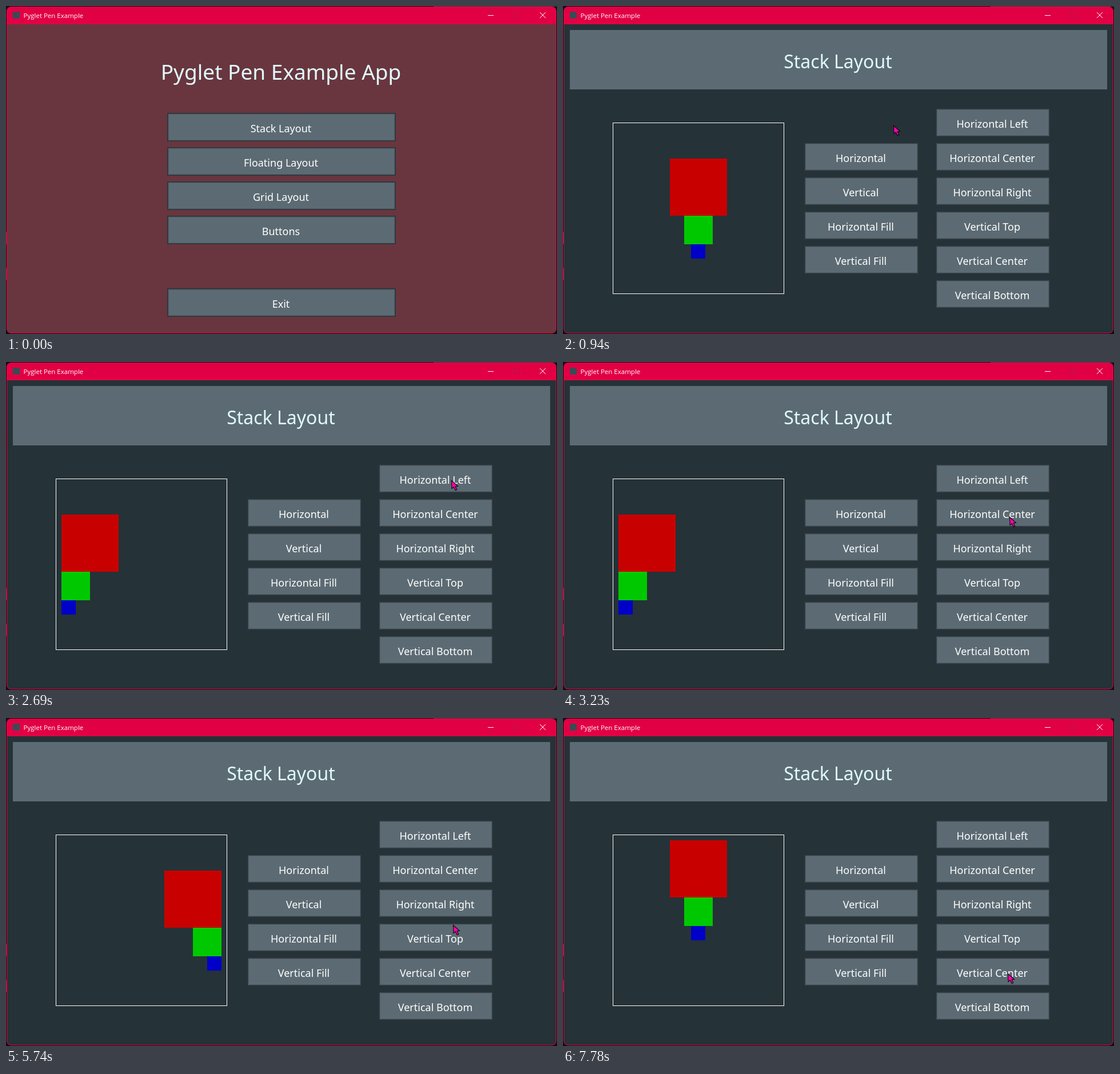
An HTML page with a canvas for the animation above (8 s loop, 964 by 574 pixels).

```html
<!DOCTYPE html>
<html lang="en">
<head>
<meta charset="utf-8">
<title>Pyglet Pen Example</title>
<style>
html, body { margin: 0; width: 100%; height: 100%; overflow: hidden; background: #0b0e11; }
canvas { display: block; }
</style>
</head>
<body>
<canvas id="stage" width="964" height="574"></canvas>
<script>
const ctx = document.getElementById('stage').getContext('2d');
const LOOP = 8000, STEP = 65, HOLD = 70;
const RED = '#e20044', SLATE = '#5c6b73', DARK = '#253237', PALE = '#e0fbfc';

// The pointer glides to each place between two times and rests there.
const entry = { x: 652, y: 545 };
const glides = [
  { from: 130, to: 610, x: 575, y: 204 },
  { from: 940, to: 1490, x: 652, y: 354 },
  { from: 1690, to: 1950, x: 755, y: 235 },
  { from: 2020, to: 2150, x: 765, y: 197 },
  { from: 2490, to: 2760, x: 781, y: 208 },
  { from: 3100, to: 3230, x: 781, y: 271 },
  { from: 3770, to: 4000, x: 784, y: 320 },
  { from: 4270, to: 4620, x: 782, y: 385 },
  { from: 5740, to: 5740, x: 782, y: 362 },
  { from: 5810, to: 6000, x: 781, y: 271 },
  { from: 6080, to: 6700, x: 782, y: 388 },
  { from: 6830, to: 7100, x: 782, y: 397 },
  { from: 7500, to: 7780, x: 778, y: 447 }
];

// A click holds a button down, then applies its change on release.
const clicks = [
  { at: 870, label: 'Stack Layout', set: { screen: 'stack' } },
  { at: 2420, label: 'Horizontal Left', set: { h: 0 } },
  { at: 3430, label: 'Horizontal Center', set: { h: 0.5 } },
  { at: 4200, label: 'Horizontal Right', set: { h: 1 } },
  { at: 6010, label: 'Horizontal Center', set: { h: 0.5 } },
  { at: 6760, label: 'Vertical Top', set: { v: 0 } }
];

const menu = ['Stack Layout', 'Floating Layout', 'Grid Layout', 'Buttons'];
const modes = ['Horizontal', 'Vertical', 'Horizontal Fill', 'Vertical Fill'];
const aligns = ['Horizontal Left', 'Horizontal Center', 'Horizontal Right',
  'Vertical Top', 'Vertical Center', 'Vertical Bottom'];

function box(x, y, w, h, color) {
  ctx.fillStyle = color;
  ctx.fillRect(x, y, w, h);
}

function frame(x, y, size, color) {
  ctx.strokeStyle = color;
  ctx.lineWidth = 1;
  ctx.strokeRect(x + 0.5, y + 0.5, size, size);
}

function line(x1, y1, x2, y2) {
  ctx.strokeStyle = '#fff';
  ctx.lineWidth = 1;
  ctx.beginPath();
  ctx.moveTo(x1, y1);
  ctx.lineTo(x2, y2);
  ctx.stroke();
}

function panel(x, y, w, h, radii, color) {
  ctx.fillStyle = color;
  ctx.beginPath();
  ctx.roundRect(x, y, w, h, radii);
  ctx.fill();
}

function text(str, x, y, size, color) {
  ctx.font = `${size}px "Noto Sans", sans-serif`;
  ctx.textAlign = 'center';
  ctx.fillStyle = color;
  ctx.fillText(str, x, y);
}

function button(label, x, y, w, pressed) {
  const fill = label === pressed ? '#455259' : SLATE;
  box(x, y, w, 50, fill);
  // Bevel: dark rim fading inwards.
  [0.6, 0.45, 0.12].forEach((alpha, i) => {
    ctx.strokeStyle = `rgba(10,16,20,${alpha})`;
    ctx.lineWidth = 1;
    ctx.strokeRect(x + i + 0.5, y + i + 0.5, w - 2 * i - 1, 49 - 2 * i);
  });
  text(label, x + w / 2 - 1, y + 34, 18, '#fff');
}

function column(labels, x, y, w, pressed) {
  labels.forEach((label, i) => button(label, x, y + 60 * i, w, pressed));
}

function drawWindow(bg) {
  box(0, 0, 964, 574, '#0b0e11');
  box(748, 0, 216, 1, '#3a4248');
  for (const y of [396, 459]) box(0, y, 1, 21, RED);
  panel(1, 1, 962, 572, 8, RED);
  panel(2, 32, 960, 540, [0, 0, 7, 7], bg);
  box(12, 10, 12, 12, '#3b4a55');
  ctx.font = '500 11.5px "Open Sans", sans-serif';
  ctx.textAlign = 'left';
  ctx.fillStyle = '#fff';
  ctx.fillText('Pyglet Pen Example', 30.5, 21);
  line(843, 16.5, 853, 16.5);
  line(934, 11, 944, 21);
  line(944, 11, 934, 21);
  frame(888, 11, 9, 'rgba(105,54,63,.4)');
}

function drawMenu(pressed) {
  drawWindow('#69363f');
  text('Pyglet Pen Example App', 481, 129, 37, PALE);
  column(menu, 282, 187, 400, pressed);
  button('Exit', 282, 494, 400, pressed);
}

function drawStack(pressed, h, v) {
  drawWindow(DARK);
  box(12, 42, 940, 104, SLATE);
  text('Stack Layout', 481, 109, 32, PALE);
  frame(87, 204, 299, '#fff');
  let size = 100, y = 214 + Math.round(106 * v);
  for (const color of ['#c80000', '#00c800', '#0000c8']) {
    box(97 + Math.floor((280 - size) * h), y, size, size, color);
    y += size;
    size /= 2;
  }
  column(modes, 422, 239, 200, pressed);
  column(aligns, 652, 179, 200, pressed);
}

const ease = u => u * u * (3 - 2 * u);

// The pointer advances in even ticks, the first one at the start of a glide.
function pointerAt(t) {
  const i = glides.findLastIndex(g => g.from <= t);
  if (i < 0) return null;
  const a = glides[i - 1] || entry, b = glides[i];
  const ticks = ms => Math.floor(ms / STEP) + 1;
  const k = ease(Math.min(1, ticks(t - b.from) / ticks(b.to - b.from)));
  const mix = (p, q) => Math.round(p + (q - p) * k);
  return { x: mix(a.x, b.x), y: mix(a.y, b.y) };
}

const arrow = new Path2D('M.5 .5L1 14.5L4.4 11.8L7.3 17.5L9.8 16.4L7.2 10.9L11.5 10.4Z');

function drawPointer({ x, y }, pressed) {
  ctx.save();
  ctx.translate(x, y);
  ctx.fillStyle = '#f806aa';
  ctx.fill(arrow);
  ctx.strokeStyle = '#08080a';
  ctx.lineWidth = 1.1;
  ctx.stroke(arrow);
  if (pressed) {
    ctx.fillStyle = 'rgba(250,250,0,.49)';
    ctx.beginPath();
    ctx.arc(0, -1, 12, 0, 2 * Math.PI);
    ctx.fill();
  }
  ctx.restore();
}

function draw(t) {
  const state = { screen: 'menu', h: 0.5, v: 0.5 };
  let pressed = null;
  for (const c of clicks) {
    if (t >= c.at + HOLD) Object.assign(state, c.set);
    else if (t >= c.at) pressed = c.label;
  }
  if (state.screen === 'menu') drawMenu(pressed);
  else drawStack(pressed, state.h, state.v);
  const pos = pointerAt(t);
  if (pos) drawPointer(pos, pressed);
}

const began = performance.now();
function tick() {
  draw((performance.now() - began) % LOOP);
  requestAnimationFrame(tick);
}
tick();
</script>
</body>
</html>
```
